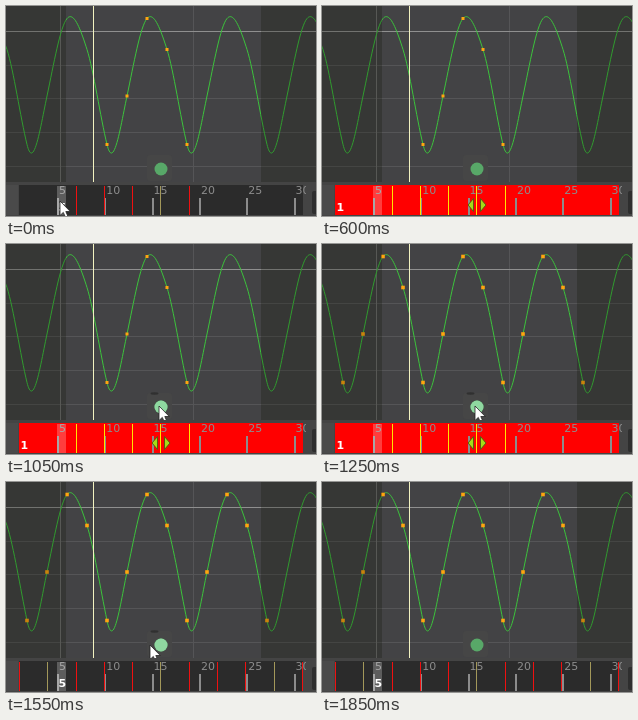
Write an HTML page that moves like this. It is 310 by 210 pixels and loops after 2.25 s.

```html
<!DOCTYPE html>
<html lang="en">
<head>
<meta charset="utf-8">
<title>Curve cycle</title>
<style>
  html, body { margin: 0; width: 100%; height: 100%; overflow: hidden; background: #444; }
  svg { display: block; width: 100vw; height: 100vh; }
  text { font: 11px "DejaVu Sans", sans-serif; }
  .value { font-weight: bold; fill: #fff; }
  .pointer { fill: #fff; }
  .before, .after, .plain, .cycled, .range, .hover, .pointer {
    animation: 2250ms step-end infinite;
  }
  .before { animation-name: before; }
  .after { animation-name: after; }
  .plain { animation-name: plain; }
  .cycled { animation-name: cycled; }
  .range { animation-name: range; }
  .hover { animation-name: hover; }
  .pointer.low { animation-name: low; }
  .pointer.high { animation-name: high; }

  @keyframes before { 0% { opacity: 1 } 51.11%, to { opacity: 0 } }
  @keyframes after { 0% { opacity: 0 } 51.11%, to { opacity: 1 } }
  @keyframes plain { 0% { opacity: 1 } 17.77%, to { opacity: 0 } }
  @keyframes cycled { 0% { opacity: 0 } 57.77%, to { opacity: 1 } }
  @keyframes range { 0% { opacity: 0 } 17.77% { opacity: 1 } 57.77%, to { opacity: 0 } }
  @keyframes hover {
    0% { opacity: 0 } 37.77% { opacity: 1 }
    77.77% { opacity: .66 } 80% { opacity: .33 } 82.22%, to { opacity: 0 }
  }
  @keyframes low {
    0% { transform: translate(54px, 195px); opacity: 1 }
    24.44% { transform: translate(62px, 199px); opacity: 1 }
    26.66%, to { opacity: 0 }
  }
  @keyframes high {
    0% { opacity: 0 }
    37.77% { transform: translate(153px, 166px); opacity: 1; fill: #2c2c2c }
    40% { transform: translate(153px, 164px); opacity: 1; fill: #fff }
    42.22% { transform: translate(153px, 163px); opacity: 1; fill: #fff }
    44.44% { transform: translate(153px, 162px); opacity: 1; fill: #fff }
    68.88% { transform: translate(144px, 163px); opacity: 1; fill: #fff }
    71.11%, to { opacity: 0 }
  }
</style>
</head>
<body>
<svg viewBox="0 0 310 210" preserveAspectRatio="none">
  <defs>
    <path id="arrow" d="M0 0V14.5L3.3 11.4 5.8 17 8.2 16 5.8 10.5H10.3Z"
      stroke="#222" stroke-width=".8"/>
    <clipPath id="bar"><path d="M12 176H300V210H12Z"/></clipPath>
  </defs>

  <!-- graph -->
  <path fill="#434345" d="M0 0H310V176H0Z"/>
  <g fill="none" stroke="#555557">
    <path d="M0 59.5H310M0 92.5H310M0 126.5H310M0 160.5H310M187.5 0V176"/>
    <path stroke="#6e6e6e" d="M54.5 0V176"/>
    <path stroke="#8f8f8f" d="M0 25.5H310"/>
  </g>
  <g id="graph" fill="#ffa50f"></g>
  <path fill="#0c0e00" opacity=".22" d="M0 0H60V176H0ZM255 0H310V176H255Z"/>
  <path fill="#f2f2c0" d="M87 0H88V176H87Z"/>

  <!-- button -->
  <rect x="141" y="149" width="25" height="26" rx="3" fill="#464646"/>
  <circle cx="155" cy="163" r="6.5" fill="#58a868"/>
  <g class="hover">
    <ellipse cx="148.500" cy="149.500" rx="4" ry="1.2" fill="#303030"/>
    <circle cx="155" cy="163" r="6.5" fill="#8fd8a0"/>
  </g>
  <use class="pointer high" href="#arrow"/>

  <!-- time slider -->
  <path fill="#444" d="M0 176H310V210H0Z"/>
  <path fill="#4a4a4a" d="M0 179H12V209H0Z"/>
  <path fill="#2b2b2b" d="M13 179H297V209H13Z"/>
  <rect x="306" y="185" width="8" height="23" rx="2" fill="#2e2e2e"/>
  <g id="slider" clip-path="url(#bar)"></g>
  <use class="pointer low" href="#arrow"/>
</svg>
<script>
  const get = id => document.getElementById(id);
  const span = (n, fn) => Array.from({ length: n }, (_, i) => fn(i)).join('');

  // One cycle of keys, 20px apart; slopes are per key step.
  const levels = [43.5, 138.5, 90, 12.5];
  const keyX = i => 1 + 20 * i;
  const keyY = i => levels[i % 4];

  function curve(dip) {
    const slopes = [63, dip, -95, -23.25];
    const third = 20 / 3;
    const segments = span(16, i => {
      const x = keyX(i), a = slopes[i % 4] / 3, b = slopes[(i + 1) % 4] / 3;
      return `C${x + third} ${keyY(i) + a} ${x + 20 - third} ${keyY(i + 1) - b} ${x + 20} ${keyY(i + 1)}`;
    });
    return `<path fill="none" stroke="#3cc43c" d="M-1 38L1 43.5${segments}"/>`;
  }

  const keys = (first, count, size) => span(count, i =>
    `<rect x="${keyX(first + i) - size / 2}" y="${keyY(first + i) - size / 2}" width="${size}" height="${size}"/>`);

  get('graph').innerHTML =
    `<g class="before">${curve(82)}${keys(5, 5, 3)}</g>` +
    `<g class="after">${curve(96)}${keys(1, 13, 3.6)}</g>`;

  // Slider marks: one per key; every fourth has its own colour.
  const markX = i => Math.floor(13.4 + 28.3 * i);
  const mark = (i, color) => `<rect x="${markX(i)}" y="180" width="1" height="29" fill="${color}"/>`;
  const keyMark = i => mark(i, i % 4 === 1 ? '#a3985a' : '#f01010');

  get('slider').innerHTML =
    `<path id="range" class="range" fill="#f00" d="M13 179H297V209H13Z"/>` +
    span(6, i => {
      const x = 51 + 47.3 * i;
      return `<rect x="${Math.round(x)}" y="192" width="2" height="17" fill="#8c8c8c"/>
        <text x="${x + 2}" y="188" fill="#8c8c8c">${5 + 5 * i}</text>`;
    }) +
    `<g class="plain">${span(5, i => keyMark(i + 2))}</g>
    <g class="cycled">${span(11, keyMark)}</g>
    <g class="range">${span(5, i => mark(i + 2, '#ffe600'))}</g>
    <path fill="#fff" opacity=".24" d="M51 180H60V209H51Z"/>
    <text class="value plain" x="52.5" y="205">5</text>
    <text class="value cycled" x="52.5" y="205">5</text>
    <g class="range">
      <text class="value" x="14.5" y="205">1</text>
      <path fill="#a4dc18" stroke="#5a5a10" d="M151.5 192.5V205.5L146 199ZM158.5 192.5V205.5L164 199Z"/>
    </g>`;
</script>
</body>
</html>
```
